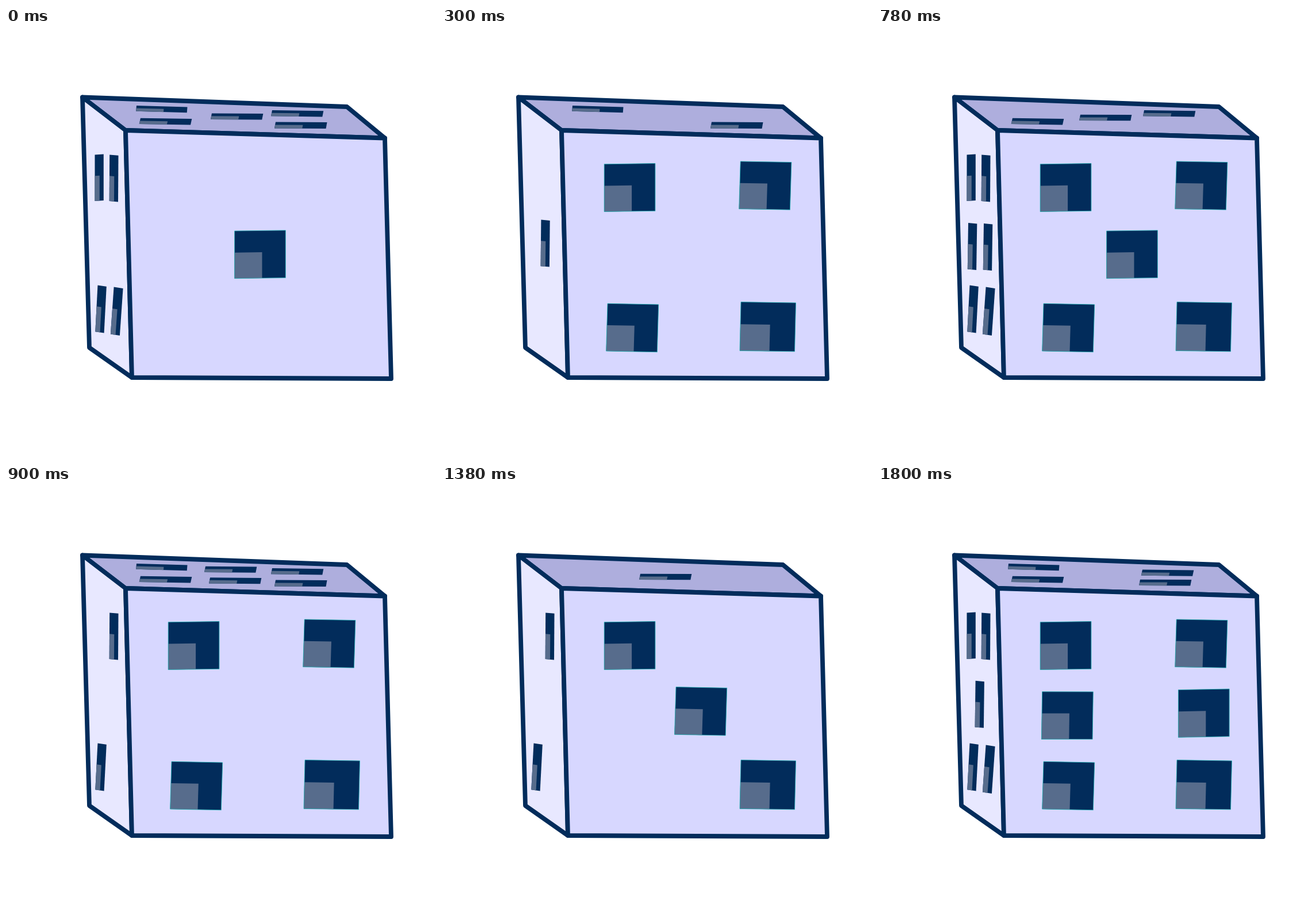
Write an HTML page with a canvas that moves like this. It is 748 px wide and 748 px high and loops after 2.1 s.

```html
<!DOCTYPE html>
<html lang="en">
<head>
<meta charset="utf-8">
<title>Rolling die</title>
<style>
html, body { margin: 0; width: 100%; height: 100%; overflow: hidden; background: #fff; }
canvas { display: block; width: 748px; height: 748px; }
</style>
</head>
<body>
<canvas id="stage" width="748" height="748"></canvas>
<script>
const ctx = document.getElementById('stage').getContext('2d');
const INK = '#022c5b';
const STEP = 300;

// Each pip: left, top, rise of its top edge, lean of its left edge, optional own size.
const faces = [
  {
    fill: '#aeaedd', size: [89.3, 10.3], patch: [0.54, 0.45],
    outline: [[133, 120.5], [593, 137], [659, 191.5], [208, 178]],
    pips: {
      A: [227, 135, 2.5, -0.8, 88.5, 9.8], B: [463, 143, 1.3, -2],
      C: [234, 156.8, 1.3, -2.3], D: [469, 163.6, 0.5, -2, 89.5, 10.9],
      E: [358, 148.6, 0.5, -2], F: [352, 150.8, 0.2, -2],
      G: [347, 139.8, 0.6, -2], H: [355, 159.2, 0.8, -2],
      I: [345, 152.8, 0.2, -2], J: [460, 145.5, 1, -2.2],
      K: [456, 162.8, 0.3, -2]
    },
    rolls: ['ACEBD', 'AD', 'CFB', 'ABCDGH', 'I', 'I', 'ACJK']
  },
  {
    fill: '#e8e8ff', size: [15.3, 80.6], patch: [0.54, 0.455],
    outline: [[133, 120.5], [208, 178], [219, 608], [145, 556]],
    pips: {
      A: [154.5, 220.5, -1, 0], B: [180.2, 220.5, 1.3, -0.5],
      C: [159.5, 447.6, 2.2, -4.2], D: [187.6, 450.6, 2.4, -5.7, 16, 82],
      E: [172.4, 333.6, 1.4, -0.8], F: [157, 339, 1.4, -1.2],
      G: [184, 340, 1.4, -1.2], H: [169.6, 338.8, 1.4, -1]
    },
    rolls: ['ABCD', 'E', 'ABCDFG', 'BC', 'BC', 'ABCDH', 'ABCDH']
  },
  {
    fill: '#d7d7ff', size: [88.7, 82.7], patch: [0.54, 0.455], rim: '#25b5b5',
    outline: [[208, 178], [659, 191.5], [670, 610], [219, 608]],
    pips: {
      A: [282.2, 236.8, -1.2, 0], B: [519.2, 232, 1.5, -2.5],
      C: [288, 479.3, 1.7, -2.4], D: [520, 476.6, 1.4, -2, 95.5, 84.8],
      E: [397.6, 353, -1.1, 0], F: [407, 349.6, 1.7, -2.5],
      G: [285.6, 357.8, 0.1, -1.2], H: [522.4, 354.6, -1.6, 0]
    },
    rolls: ['E', 'ABCD', 'ABCDE', 'ABCD', 'AFD', 'ABCD', 'ABCDGH']
  }
];

function trace(points) {
  ctx.beginPath();
  points.forEach(([x, y]) => ctx.lineTo(x, y));
  ctx.closePath();
}

function drawPip(face, [x, y, rise, lean, w = face.size[0], h = face.size[1]]) {
  const at = (u, v) => [x + u * w + v * lean, y + u * rise + v * h];
  const quad = (u, v) => trace([at(0, v), at(u, v), at(u, 1), at(0, 1)]);
  quad(1, 0);
  ctx.fillStyle = INK;
  ctx.fill();
  quad(...face.patch);
  ctx.fillStyle = '#576c8c';
  ctx.fill();
  if (face.rim) {
    quad(1, 0);
    ctx.strokeStyle = face.rim;
    ctx.lineWidth = 0.8;
    ctx.stroke();
  }
}

function drawFace(face, roll) {
  trace(face.outline);
  ctx.fillStyle = face.fill;
  ctx.fill();
  ctx.strokeStyle = INK;
  ctx.lineWidth = 7.8;
  ctx.lineJoin = 'round';
  ctx.stroke();
  for (const name of face.rolls[roll]) drawPip(face, face.pips[name]);
}

function draw() {
  const roll = Math.floor(performance.now() / STEP) % 7;
  ctx.clearRect(0, 0, 748, 748);
  faces.forEach(face => drawFace(face, roll));
  requestAnimationFrame(draw);
}
draw();
</script>
</body>
</html>
```
